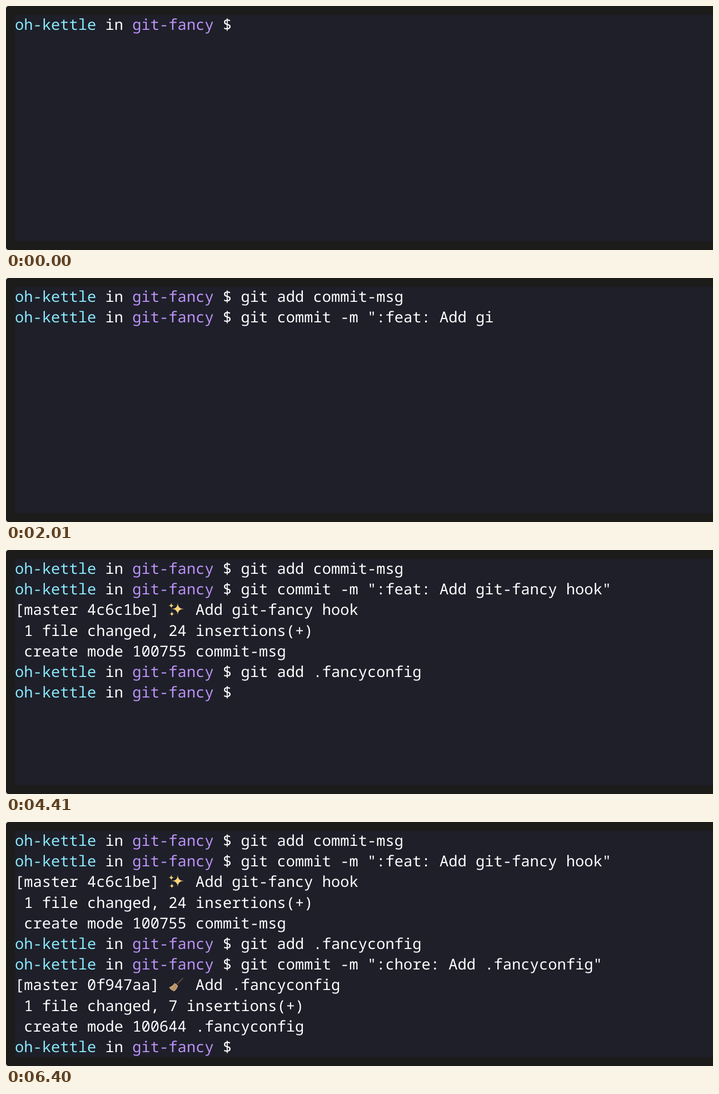
An HTML page that plays this animation: 1272 by 440 pixels, repeating every 8.9 s.

```html
<!DOCTYPE html>
<html lang="en">
<head>
<meta charset="utf-8">
<title>Terminal session</title>
<style>
  html, body { margin: 0; width: 100%; height: 100%; overflow: hidden; background: #fff; }
  svg { display: block; width: 1272px; height: 440px; }
  text {
    font: 27.1px "Noto Sans Mono", "DejaVu Sans Mono", monospace;
    font-variant-ligatures: none;
    text-rendering: geometricPrecision;
    white-space: pre;
    fill: #fff;
  }
  .user { fill: #8be9fd; }
  .repo { fill: #bd93f9; }
</style>
</head>
<body>
<svg viewBox="0 0 1272 440">
  <path fill="#1c1d1a" d="M5 0H1272V440H5Q0 440 0 435V5Q0 0 5 0Z"/>
  <path fill="#1e1f29" d="M15.5 15.5H1272V424.5H15.5Z"/>
  <g id="screen"></g>
</svg>
<script>
const LOOP = 8900, KEY_TIME = 30;
const LEFT = 16, CELL = 16.26, BASELINE = 42.9, LINE = 37.2;
const PROMPT = '<tspan class="user">oh-kettle</tspan> in <tspan class="repo">git-fancy</tspan> $ ';

const star = (x, y, r) =>
  `<path fill="#fbd578" d="M${x} ${y - r}Q${x} ${y} ${x + r} ${y}Q${x} ${y} ${x} ${y + r}` +
  `Q${x} ${y} ${x - r} ${y}Q${x} ${y} ${x} ${y - r}Z"/>`;

// Icons are drawn relative to the baseline of their cell.
const SPARKLES = star(16.5, -11, 11.5) + star(5, -17, 5.5) + star(6, -2, 5);
const BROOM =
  '<path stroke="#6b4d3c" stroke-width="1.8" d="M26 -22L14 -10"/>' +
  '<path fill="#c9a472" d="M11 -13L17 -8Q15 -1 10 2Q4 0 1 -5Q7 -7 11 -13Z"/>' +
  '<path stroke="#8d6845" fill="none" d="M9 -11L15 -5M12 -7L5 -2M13 -5L8 0"/>';

// Commands are typed key by key up to `keys`; the rest is completed at `done`.
const command = (at, start, text, keys = text.length, done = Infinity) =>
  ({ at, start, text, keys, done });
const output = (at, text, icon) => ({ at, text, icon });

const rows = [
  command(0, 30, 'git add commit-msg', 11, 520),
  command(680, 1200, 'git commit -m ":feat: Add git-fancy hook"'),
  output(2700, '[master 4c6c1be]    Add git-fancy hook', SPARKLES),
  output(2700, ' 1 file changed, 24 insertions(+)'),
  output(2700, ' create mode 100755 commit-msg'),
  command(2700, 3730, 'git add .fancyconfig', 12, 4250),
  command(4410, 4930, 'git commit -m ":chore: Add .fancyconfig"'),
  output(6400, '[master 0f947aa]    Add .fancyconfig', BROOM),
  output(6400, ' 1 file changed, 7 insertions(+)'),
  output(6400, ' create mode 100644 .fancyconfig'),
  command(6400, LOOP, '')
];

function typed({ start, text, keys, done }, time) {
  if (time >= done) return text;
  const count = Math.floor((time - start) / KEY_TIME) + 1;
  return text.slice(0, Math.max(0, Math.min(keys, count)));
}

function rowMarkup(row, index, time) {
  if (time < row.at) return '';
  const y = BASELINE + index * LINE;
  const content = row.start === undefined ? row.text : PROMPT + typed(row, time);
  const icon = row.icon ? `<g transform="translate(${LEFT + 17 * CELL} ${y})">${row.icon}</g>` : '';
  return `<text x="${LEFT}" y="${y}">${content}</text>${icon}`;
}

const screen = document.getElementById('screen');
let shown = '';

function draw(now) {
  const time = now % LOOP;
  const markup = rows.map((row, index) => rowMarkup(row, index, time)).join('');
  if (markup !== shown) screen.innerHTML = shown = markup;
  requestAnimationFrame(draw);
}
draw(performance.now());
</script>
</body>
</html>
```
